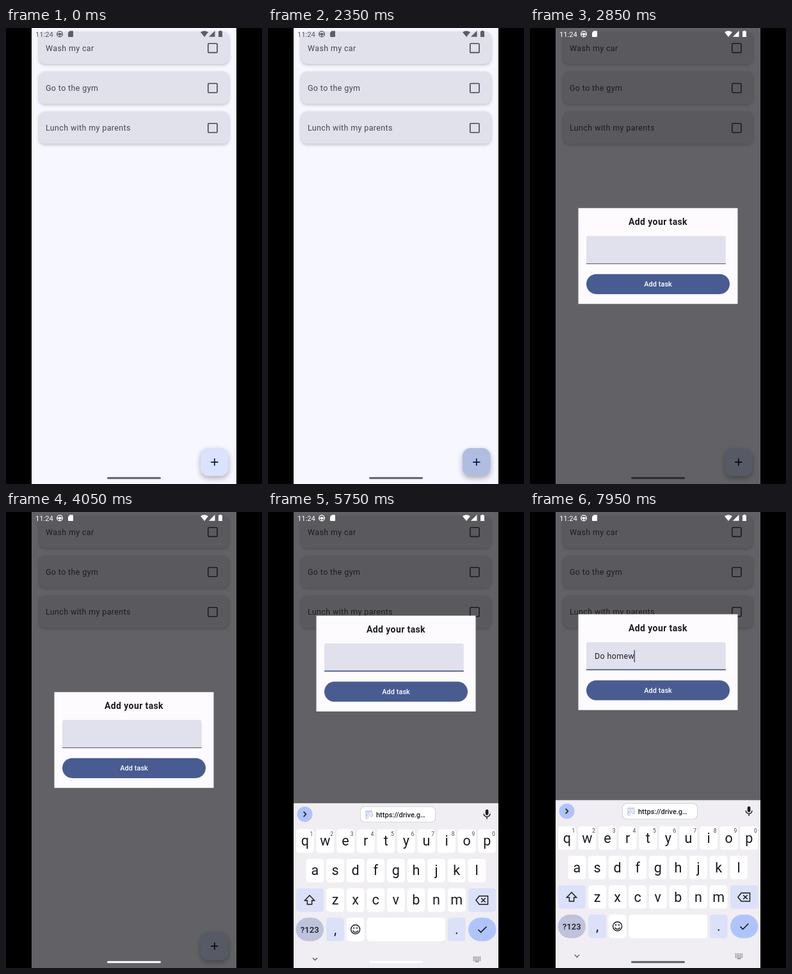
An HTML page with a canvas that plays this animation: 400 px wide and 711 px high, repeating every 8 s.

```html
<!DOCTYPE html>
<html lang="en">
<head>
<meta charset="utf-8">
<title>Task list</title>
<style>
  html, body { margin: 0; width: 100%; height: 100%; overflow: hidden; background: #000; }
  canvas { display: block; width: 400px; height: 711px; }
</style>
</head>
<body>
<canvas id="stage" width="400" height="711"></canvas>
<script>
const ctx = document.getElementById('stage').getContext('2d');
const LOOP = 8000;
const PRIMARY = '#485c92';
const INK = '#1a1b21';
const KEY_TINT = '#dbe1f8';

const TYPING = [
  [5850, 'D'], [5950, 'Do'], [6000, 'Do '], [6100, 'Do h'], [6200, 'Do ho'],
  [6350, 'Do hom'], [6550, 'Do home'], [6750, 'Do homew']
];
const FOCUS_AT = 4100;

const clamp = x => Math.max(0, Math.min(1, x));
const span = (t, from, to) => clamp((t - from) / (to - from));
const easeOut = x => 1 - (1 - x) ** 3;
const mix = (a, b, p) => a + (b - a) * p;
const mixColor = (a, b, p) => `rgb(${a.map((v, i) => Math.round(mix(v, b[i], p)))})`;

function box(x, y, w, h, r, fill) {
  ctx.beginPath();
  ctx.roundRect(x, y, w, h, r);
  ctx.fillStyle = fill;
  ctx.fill();
}

function shadowBox(x, y, w, h, r, fill, blur, dy, alpha) {
  ctx.save();
  ctx.shadowColor = `rgba(0,0,0,${alpha})`;
  ctx.shadowBlur = blur;
  ctx.shadowOffsetY = dy;
  box(x, y, w, h, r, fill);
  ctx.restore();
}

function text(str, x, y, size, color, { weight = 400, align = 'left', spacing = 0 } = {}) {
  ctx.font = `${weight} ${size}px Roboto, sans-serif`;
  ctx.letterSpacing = `${spacing}px`;
  ctx.textAlign = align;
  ctx.fillStyle = color;
  ctx.fillText(str, x, y);
}

// Strokes or fills an SVG path placed at (x, y).
function icon(d, x, y, scale, color, width = 0) {
  ctx.save();
  ctx.translate(x, y);
  ctx.scale(scale, scale);
  const path = new Path2D(d);
  if (width) {
    ctx.strokeStyle = color;
    ctx.lineWidth = width;
    ctx.stroke(path);
  } else {
    ctx.fillStyle = color;
    ctx.fill(path, 'evenodd');
  }
  ctx.restore();
}

function drawCard(label, y) {
  shadowBox(51.5, y, 297, 50, 9.3, '#e1e1ec', 5, 1.5, 0.24);
  text(label, 62, y + 29.6, 12.45, '#45464f', { spacing: 0.39 });
  ctx.strokeStyle = '#45464f';
  ctx.lineWidth = 1.6;
  ctx.beginPath();
  ctx.roundRect(315.8, y + 18.2, 14.2, 14.2, 1.2);
  ctx.stroke();
}

function drawFab(t) {
  const press = span(t, 2230, 2330) * (1 - span(t, 2580, 2720));
  const fill = mixColor([218, 226, 253], [176, 189, 224], press);
  shadowBox(304, 655, 43.6, 43.6, 12.4, fill, 8, 3.5, 0.3);
  icon('M-5.6 0H5.6M0-5.6V5.6', 325.8, 676.8, 1, '#001944', 1.7);
}

function drawList(t) {
  ctx.fillStyle = '#f7f7ff';
  ctx.fillRect(40, 0, 320, 711);
  ['Wash my car', 'Go to the gym', 'Lunch with my parents']
    .forEach((label, i) => drawCard(label, 6 + i * 62.3));
  drawFab(t);
}

function drawStatusBar(t) {
  const color = mixColor([93, 93, 99], [255, 255, 255], span(t, 2640, 2800));
  text('11:24', 46, 13.6, 11.2, color);
  icon('M88.3 9.5A4.3 4.3 0 1 1 79.7 9.5A4.3 4.3 0 1 1 88.3 9.5M79.5 9.5H88.5M84 9.5V14', 0, 0, 1, color, 1.3);
  icon('M82 9.5a2 2 0 1 0 4 0a2 2 0 1 0-4 0', 0, 0, 1, color);
  icon('M99.7 4.5H104Q105 4.5 105 5.5V13Q105 14 104 14H98Q97 14 97 13V7.2Z', 0, 0, 1, color);
  icon('M304 6.6Q310 2.2 316 6.6L310 14Z', 0, 0, 1, color);
  icon('M326.5 4.2V13.8H316.9Z', 0, 0, 1, color);
  icon('M333.8 4h2.4v1H338v9h-6V5h1.8Z', 0, 0, 1, color);
}

function drawNavPill(t) {
  let color;
  if (t < 3500) color = mixColor([96, 96, 102], [42, 42, 45], span(t, 2640, 2850));
  else if (t < 6050) color = mixColor([42, 42, 45], [255, 255, 255], span(t, 3500, 3850));
  else color = mixColor([228, 228, 230], [94, 94, 98], span(t, 6150, 6400));
  box(158, 700.2, 84, 3, 1.5, color);
}

function drawField(t, top) {
  const focus = span(t, 4050, 4200);
  box(88, top, 217.8, 43.6, [3.1, 3.1, 0, 0], '#e0e1ec');
  const line = mix(0.9, 1.7, focus);
  ctx.fillStyle = mixColor([70, 70, 79], [72, 92, 146], focus);
  ctx.fillRect(88, top + 43.8 - line, 217.8, line);
  if (t < FOCUS_AT) return;

  const [lastKey, typed] = TYPING.filter(([at]) => t >= at).pop() || [FOCUS_AT, ''];
  const base = top + 26.2;
  text(typed, 101, base, 12.45, INK, { spacing: 0.39 });
  const width = ctx.measureText(typed).width;
  if (t < 6750 && typed.length > 4) {
    const start = ctx.measureText('Do ').width;
    const end = ctx.measureText(typed.slice(0, -1)).width;
    ctx.fillRect(101 + start, base + 1.6, end - start, 0.9);
  }
  if ((t - lastKey) % 1000 < 500) {
    ctx.fillStyle = PRIMARY;
    ctx.fillRect(100.2 + width, top + 12.4, 1.6, 19);
  }
}

function drawDialog(t, lift) {
  const enter = span(t, 2640, 2830);
  if (!enter) return;
  ctx.save();
  ctx.globalAlpha = easeOut(enter);
  ctx.translate(0, 14 * (1 - enter) ** 3 - 121.4 * lift);
  ctx.fillStyle = '#fefbff';
  ctx.fillRect(75.5, 280.8, 249, 149.4);
  text('Add your task', 200, 307.2, 14, INK, { weight: 700, align: 'center', spacing: 0.39 });
  drawField(t, 324.3);
  box(88, 383.8, 224, 31.1, 15.55, PRIMARY);
  text('Add task', 200, 403.2, 10.9, '#fff', { weight: 500, align: 'center', spacing: 0.08 });
  ctx.restore();
}

function drawKey(x, y, label, fill = '#fff') {
  box(x - 13.9, y, 27.8, 36.6, 4.5, fill);
  text(label, x, y + 25.6, 21.5, INK, { align: 'center' });
}

function drawKeyRow(letters, firstX, y) {
  [...letters].forEach((letter, i) => drawKey(firstX + i * 31.6, y, letter));
}

function drawSuggestions() {
  box(45.5, 454.5, 24, 24, 12, '#b0c4fc');
  icon('M55.6 462.6l3.8 3.9l-3.8 3.9', 0, 0, 1, INK, 1.6);
  box(144, 454.2, 118, 25, 7, '#c9c9d2');
  box(144.8, 455, 116.4, 23.4, 6.3, '#fff');
  icon('M157 472.5H153V461.5H162.5V465M155.5 461.5V463.5H160V461.5M157.5 469.8h-1a2 2 0 0 1 0-4h2M160.5 465.8h1a2 2 0 0 1 0 4h-2M157.3 467.8h3.4', 0, 0, 1, '#b3bde6', 1.2);
  text('https://drive.g…', 169, 471.2, 11, INK, { weight: 500 });
  box(339.8, 459, 4.6, 9, 2.3, INK);
  icon('M337.2 465.6a4.9 4.9 0 0 0 9.8 0M342.1 470.5V474', 0, 0, 1, INK, 1.4);
}

function drawKeyboard(rise) {
  if (!rise) return;
  ctx.save();
  ctx.translate(0, 262 * (1 - rise));
  ctx.fillStyle = '#f0eef2';
  ctx.fillRect(40, 449.3, 320, 262);
  drawSuggestions();

  drawKeyRow('qwertyuiop', 57.8, 490);
  [...'1234567890'].forEach((digit, i) =>
    text(digit, 68 + i * 31.6, 500, 8.6, '#45464f', { align: 'center' }));
  drawKeyRow('asdfghjkl', 73.4, 536);
  drawKeyRow('zxcvbnm', 105, 582);

  box(43.5, 582, 43.5, 36.6, 4.5, KEY_TINT);
  icon('M65 593l-7.6 8h4v6h7.2v-6h4Z', 0, 0, 1, INK, 1.5);
  box(313, 582, 43.5, 36.6, 4.5, KEY_TINT);
  icon('M330 594H343.5V607H330L325 600.5ZM333.2 597.2l6.6 6.6M339.8 597.2l-6.6 6.6', 0, 0, 1, INK, 1.5);

  box(43.5, 627.8, 43.5, 36.6, 18.3, '#bdc3dc');
  text('?123', 65.2, 651, 13.2, INK, { align: 'center', weight: 500 });
  drawKey(105, 627.8, ',', KEY_TINT);
  drawKey(136.6, 627.8, '');
  icon('M143.6 646a7 7 0 1 1-14 0a7 7 0 1 1 14 0M132.8 647.8a4 4 0 0 0 7.6 0', 0, 0, 1, INK, 1.4);
  box(133, 642.8, 2.2, 2.2, 1.1, INK);
  box(138, 642.8, 2.2, 2.2, 1.1, INK);
  box(154.3, 627.8, 122.7, 36.6, 4.5, '#fff');
  drawKey(294.8, 627.8, '.', KEY_TINT);
  box(313, 627.8, 43.5, 36.6, 18.3, '#b0c4fc');
  icon('M328.4 646.4l4.2 4.2l8.8-8.8', 0, 0, 1, INK, 1.6);

  icon('M69.8 690.4l3.6 3.6l3.6-3.6', 0, 0, 1, '#55555a', 1.3);
  ctx.fillStyle = '#66666b';
  for (let row = 0; row < 3; row++)
    for (let col = 0; col < 5; col++)
      ctx.fillRect(320.7 + col * 2.5, 688.6 + row * 2.4, 1.5, 1.4);
  ctx.fillRect(323.5, 695.8, 6, 1.2);
  ctx.restore();
}

function draw(t) {
  ctx.fillStyle = '#000';
  ctx.fillRect(0, 0, 400, 711);
  ctx.save();
  ctx.beginPath();
  ctx.rect(40, 0, 320, 711);
  ctx.clip();
  drawList(t);
  ctx.fillStyle = `rgba(0,0,0,${0.6 * span(t, 2640, 2845)})`;
  ctx.fillRect(40, 0, 320, 711);
  drawStatusBar(t);
  const rise = easeOut(span(t, 5530, 5830));
  drawDialog(t, rise);
  drawKeyboard(rise);
  drawNavPill(t);
  ctx.restore();
}

const start = performance.now();
function tick() {
  draw((performance.now() - start) % LOOP);
  requestAnimationFrame(tick);
}
tick();
</script>
</body>
</html>
```
